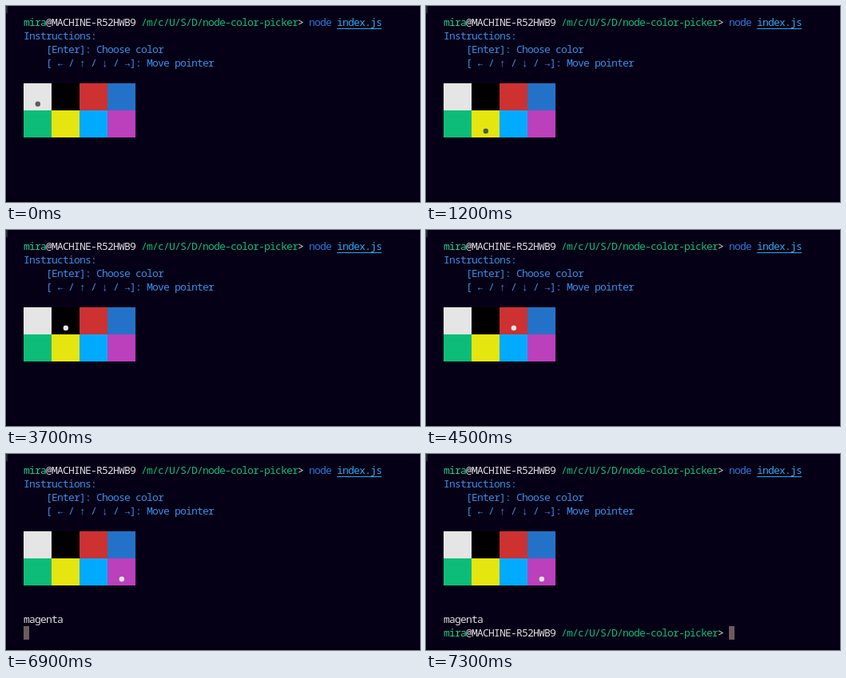
Animation, 518 px wide and 246 px high, one loop 7.5 s. Source, as an HTML page:

```html
<!DOCTYPE html>
<html lang="en">
<head>
<meta charset="utf-8">
<title>Terminal color picker</title>
<style>
  html, body { margin: 0; width: 100%; height: 100%; overflow: hidden; background: #060016; }
  svg { display: block; }
  text {
    font: 13px "Noto Sans Mono", "DejaVu Sans Mono", monospace;
    letter-spacing: -.8px;
    white-space: pre;
    fill: #e0e0e0;
  }
  .user { fill: #23d18b; }
  .path { fill: #10bd7a; }
  .blue { fill: #3b8eea; }
  .cmd { fill: #2f78dc; }
  .arg { fill: #35a4ec; }
</style>
</head>
<body>
<svg width="518" height="246" viewBox="0 0 518 246">
  <rect width="2" height="9" fill="#2b2932"/>
  <rect y="244" width="518" height="2" fill="#020008"/>
  <text id="prompt" x="22" y="25"><tspan class="user">mira</tspan>@MACHINE-R52HWB9 <tspan class="path">/m/c/U/S/D/node-color-picker</tspan>&gt;</text>
  <text x="379" y="25" class="cmd">node</text>
  <text x="414" y="25" class="arg">index.js</text>
  <rect x="414" y="28" width="56" height="1" fill="#35a4ec"/>
  <text x="22" y="42" class="blue">Instructions:</text>
  <text x="50" y="59" class="blue">[Enter]: Choose color</text>
  <text x="50" y="76" class="blue">[ ← / ↑ / ↓ / →]: Move pointer</text>
  <g id="cells" shape-rendering="crispEdges"></g>
  <circle id="dot" r="3.2"/>
  <text id="result" x="22" y="212">magenta</text>
  <use id="nextPrompt" href="#prompt" y="204"/>
  <rect id="cursor" y="216" width="7" height="17" fill="#6e5a5e"/>
</svg>
<script>
const LOOP = 7500, CHOSEN = 6800, PROMPT = 7100;
const COLS = 4, CELL_W = 35, CELL_H = 34;
const DARK = '#383838', LIGHT = '#e5e5e5';
// Each cell: [background, pointer]
const palette = [
  ['#e5e5e5', '#5c5c5c'], ['#000000', LIGHT], ['#cd3131', LIGHT], ['#2472c8', LIGHT],
  ['#0dbc79', DARK], ['#e5e510', '#4b5a50'], ['#00aaff', DARK], ['#bc3fbc', LIGHT]
];
// Pointer moves: [time, cell]
const moves = [
  [0, 0], [200, 1], [400, 2], [600, 3], [800, 7], [900, 6], [1200, 5],
  [1600, 1], [2000, 5], [2200, 4], [2500, 0], [3600, 1], [3800, 2],
  [4000, 6], [4500, 2], [5700, 6], [6400, 7]
];

const el = id => document.getElementById(id);
const set = (node, attrs) => {
  for (const key in attrs) node.setAttribute(key, attrs[key]);
};
const show = (id, on) => set(el(id), { visibility: on ? 'visible' : 'hidden' });
const place = i => [22 + i % COLS * CELL_W, 97 + Math.floor(i / COLS) * CELL_H];

palette.forEach(([fill], i) => {
  const [x, y] = place(i);
  const rect = document.createElementNS('http://www.w3.org/2000/svg', 'rect');
  set(rect, { x, y, width: CELL_W, height: CELL_H, fill });
  el('cells').append(rect);
});

function draw(now) {
  const t = now % LOOP;
  const cell = moves.findLast(([start]) => start <= t)[1];
  const [x, y] = place(cell);
  set(el('dot'), { cx: x + 17.8, cy: y + 26, fill: palette[cell][1] });
  show('result', t >= CHOSEN);
  show('nextPrompt', t >= PROMPT);
  show('cursor', t >= CHOSEN);
  set(el('cursor'), { x: t >= PROMPT ? 379 : 22 });
  requestAnimationFrame(draw);
}
draw(0);
</script>
</body>
</html>
```
